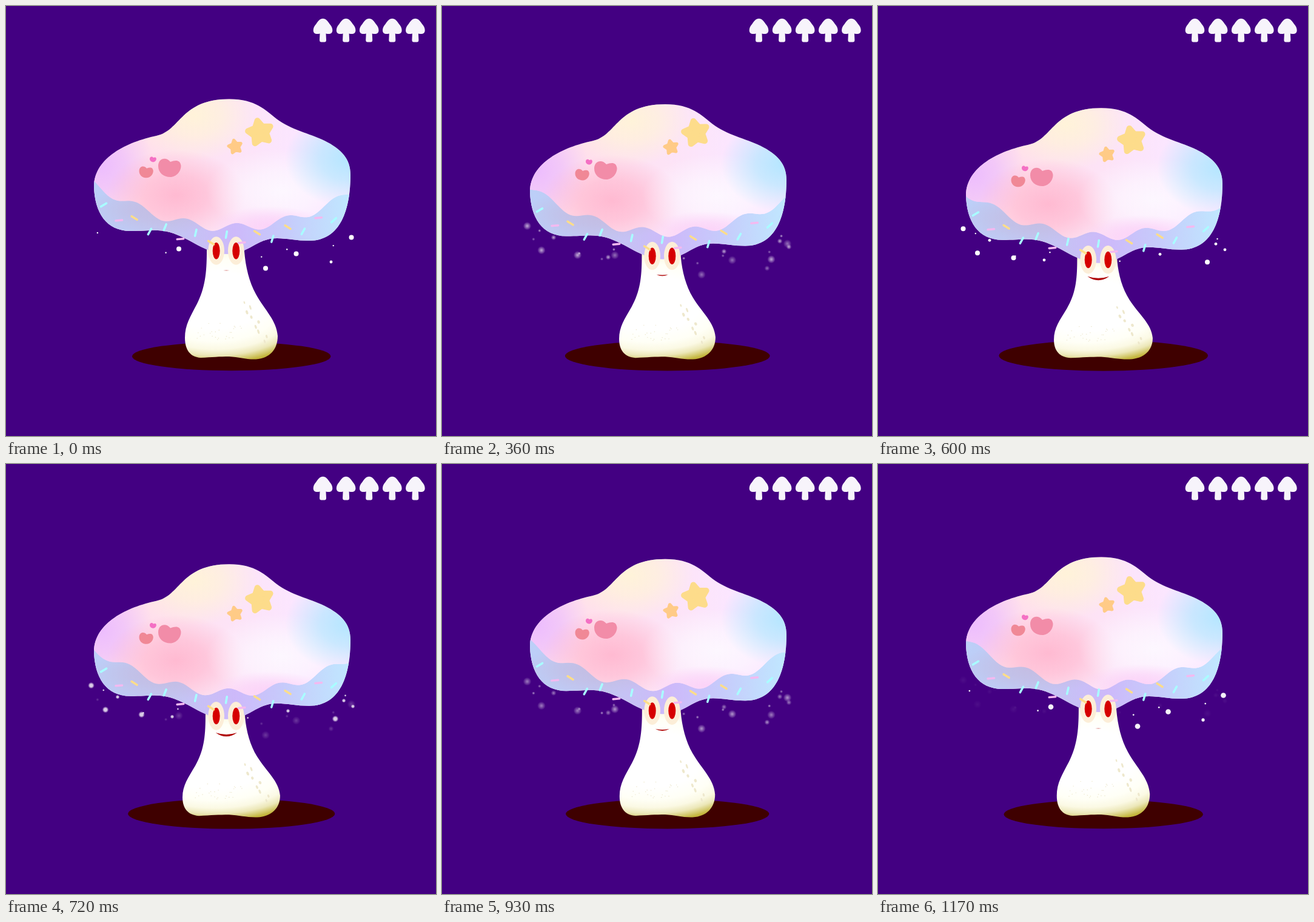
An HTML page with a canvas for the animation above (1.2 s loop, 709 by 709 pixels).

```html
<!DOCTYPE html>
<html lang="en">
<head>
<meta charset="utf-8">
<title>Bouncing mushroom</title>
<style>
  html, body { margin: 0; width: 100%; height: 100%; overflow: hidden; background: #430082; }
  canvas { display: block; width: 100vw; height: 100vh; }
</style>
</head>
<body>
<canvas id="stage" width="709" height="709"></canvas>
<script>
const ctx = document.getElementById('stage').getContext('2d');
const LOOP = 1200, STEP = 30, DROP = 15;
const WAVE_LENGTH = 82, WAVE_SPEED = .096;
const COLORS = { c: '#a9fdff', p: '#f4b9f0', y: '#fddd8a' };

const capPath = new Path2D(`M368 153.5 C412 153.5 428 172 446 186 C470 204 500 210 525 222
  C553 236 568 252 568 278 C568 335 552 387 500 387 C478 387 465 383 447 383
  C412 383 402 409 363 409 C328 408 305 383 270 373 C248 367 235 371 205 371
  C165 371 146 340 145 297 C146 250 200 224 248 214 C288 206 288 153.5 368 153.5Z`);
const bodyPath = new Path2D(`M331 385 L331 405 C331 441 328 465 315 491 C304 512 295 526 295 547
  C295 567 304 579 321 580 C340 579 352 578 368 578 C384 579 396 583 412 582.5
  C435 581 448 566 448 544 C446 518 427 502 412 475 C401 455 395 430 393 405 L393 385Z`);
const heartPath = new Path2D(`M271 257 C264 248 251 251 251 264 C251 275 260 282 271 282
  C281 282 289 272 288.5 263 C287 253 279 254 271 257Z`);
const iconPath = new Path2D(`M0 20.8 C5 20.8 8 25 11 29.5 C14 33 15.8 36 15.8 40 C15.8 46 11 47 5 45.5
  L5.5 56 Q5.5 59.5 2.5 59.5 H-2.5 Q-5.5 59.5 -5.5 56 L-5 45.5
  C-11 47 -15.8 46 -15.8 40 C-15.8 36 -14 33 -11 29.5 C-8 25 -5 20.8 0 20.8Z`);

// Eases 0 to 1 while rising, then back to 0 while falling.
function swing(time, riseStart, riseEnd, fallStart, fallEnd) {
  const ease = (from, to) => {
    const u = Math.max(0, Math.min(1, (time - from) / (to - from)));
    return (1 - Math.cos(Math.PI * u)) / 2;
  };
  return ease(riseStart, riseEnd) - ease(fallStart, fallEnd);
}

// Repeatable noise from 0 to 1.
function noise(seed) {
  const n = Math.sin(seed * 127.1) * 43758.5;
  return n - Math.floor(n);
}

function ellipse(x, y, rx, ry, color, angle = 0) {
  ctx.fillStyle = color;
  ctx.beginPath();
  ctx.ellipse(x, y, rx, ry, angle, 0, 7);
  ctx.fill();
}

function shifted(x, y, draw) {
  ctx.save();
  ctx.translate(x, y);
  draw();
  ctx.restore();
}

function gradient(shape, ...stops) {
  for (const [at, color] of stops) shape.addColorStop(at, color);
  return shape;
}

function glow(x, y, rx, ry, rgb, alpha = .95) {
  shifted(x, y, () => {
    ctx.scale(rx, ry);
    ctx.fillStyle = gradient(ctx.createRadialGradient(0, 0, 0, 0, 0, 1),
      [0, `rgba(${rgb},${alpha})`], [.45, `rgba(${rgb},${alpha * .68})`], [1, `rgba(${rgb},0)`]);
    ctx.fillRect(-1, -1, 2, 2);
  });
}

function drawIcons() {
  ctx.fillStyle = '#f7f4fb';
  for (let i = 0; i < 5; i++) shifted(522.5 + i * 38.1, 0, () => ctx.fill(iconPath));
}

function drawBody(drop, spread) {
  ctx.save();
  ctx.translate(371.5, 583);
  ctx.scale(1 + .065 * spread, 1 - drop / 170);
  ctx.translate(-371.5, -583);
  ctx.clip(bodyPath);
  shifted(345, 485, () => {
    ctx.scale(1.7, 1);
    ctx.fillStyle = gradient(ctx.createRadialGradient(0, 0, 0, 0, 0, 104),
      [.45, '#ffffff'], [.65, '#fffff6'], [.78, '#fbf9e4'], [.88, '#ece7b8'], [1, '#c3b53c']);
    ctx.fillRect(-60, -110, 130, 220);
  });
  for (let i = 0; i < 9; i++)
    ellipse(393 + 4.4 * i + 6 * Math.sin(2 * i), 489 + 8 * i, 1.2 + noise(i), 2 + 2 * noise(i + 9), '#eee8cd', -.3);
  for (let i = 0; i < 26; i++)
    ellipse(315 + 76 * noise(i + 20), 521 + 29 * noise(i + 60), .8, .7, '#ece7cc');
  ctx.restore();
}

function drawDrip(time) {
  ctx.fillStyle = gradient(ctx.createLinearGradient(145, 0, 568, 0),
    [0, '#bccff8'], [.3, '#c3c6f2'], [.55, '#cdb9fa'], [.75, '#c6cbfb'], [1, '#c0e8ff']);
  ctx.save();
  ctx.beginPath();
  for (let x = 140; x <= 572; x += 4) {
    const phase = 2 * Math.PI * (x - 380 - time * WAVE_SPEED) / WAVE_LENGTH;
    ctx.lineTo(x, 365 - .00143 * (x - 370) ** 2 - 7 * Math.cos(phase));
  }
  ctx.lineTo(572, 420);
  ctx.lineTo(140, 420);
  ctx.clip();
  ctx.fill();
  glow(260, 335, 130, 42, '196,186,222', .8);
  ctx.restore();
}

function drawCap(time) {
  ctx.save();
  ctx.clip(capPath);
  ctx.fillStyle = gradient(ctx.createLinearGradient(240, 0, 480, 0), [0, '#ffe0ec'], [1, '#fbe6ff']);
  ctx.fillRect(140, 150, 432, 262);
  glow(310, 180, 105, 75, '255,244,216');
  glow(158, 262, 85, 90, '236,187,255');
  glow(280, 312, 115, 75, '255,184,208');
  glow(455, 305, 125, 70, '253,248,255');
  glow(565, 252, 105, 80, '176,231,255');
  glow(435, 362, 95, 32, '251,206,247', .8);
  drawDrip(time);
  ctx.restore();
}

function drawStar(x, y, radius, color) {
  const corner = radius * .2;
  ctx.beginPath();
  for (let i = 0; i < 10; i++) {
    const r = (i % 2 ? radius * .63 : radius) - corner, angle = (-102 + i * 36) * Math.PI / 180;
    ctx.lineTo(x + r * Math.cos(angle), y + r * Math.sin(angle));
  }
  ctx.closePath();
  ctx.fillStyle = ctx.strokeStyle = color;
  ctx.lineWidth = corner * 2;
  ctx.lineJoin = 'round';
  ctx.fill();
  ctx.stroke();
}

function drawHeart(x, y, size, color) {
  shifted(x, y, () => {
    ctx.scale(size, size);
    ctx.translate(-270, -266.5);
    ctx.fillStyle = color;
    ctx.fill(heartPath);
  });
}

function drawFace(smile) {
  for (const x of [346.7, 379.3]) {
    ellipse(x, 403.5, 13.3, 23.3, '#fceed8');
    ellipse(x, 403.7, 6, 13.7, '#d60000');
  }
  const width = 5 + 13 * smile, corner = 436 - 5 * smile;
  ctx.globalAlpha = Math.min(1, .55 + smile);
  ctx.fillStyle = '#b00808';
  ctx.beginPath();
  ctx.moveTo(363.3 - width, corner);
  ctx.quadraticCurveTo(363.3, 435.2 + 1.8 * smile, 363.3 + width, corner);
  ctx.quadraticCurveTo(363.3, 436.8 + 7.2 * smile, 363.3 - width, corner);
  ctx.fill();
  ctx.globalAlpha = 1;
}

// Two staggered rows along the rim; cyan ones turn upright near the middle.
function drawSprinkles() {
  ctx.lineCap = 'round';
  ctx.lineWidth = 3.5;
  [...'cpyccpcycpycycpc'].forEach((kind, i) => {
    const x = 161 + 25.3 * i, bend = .0012 * (x - 363) ** 2;
    const degrees = { c: bend - 80, p: -5, y: 32 }[kind];
    shifted(x, 385 - bend + (i % 2 ? 6 : -8), () => {
      ctx.rotate(degrees * Math.PI / 180);
      ctx.strokeStyle = COLORS[kind];
      ctx.beginPath();
      ctx.moveTo(-5.3, 0);
      ctx.lineTo(5.3, 0);
      ctx.stroke();
    });
  });
}

// Spores blur as they fade.
function drawSpore(x, y, r, alpha) {
  const blur = Math.min(.85, 2 * (1 - alpha));
  const outer = r * (1 + blur * .6) + blur;
  const color = `rgba(255,255,255,${alpha})`;
  ellipse(x, y, outer, outer, blur < .12 ? color : gradient(
    ctx.createRadialGradient(x, y, r * (1 - blur), x, y, outer), [0, color], [1, 'rgba(255,255,255,0)']));
}

// Big spores have set places, tiny ones scatter under the rim.
function drawSpores(big, medium, tinyCount, seed, dy, alpha) {
  if (alpha <= 0) return;
  for (const [x, y] of big) drawSpore(x, y + dy, 4, alpha);
  for (const [x, y] of medium) drawSpore(x, y + dy, 2.4, alpha);
  for (let i = 0; i < tinyCount; i++) {
    const x = 130 + 446 * (i + noise(seed + i)) / tinyCount;
    const y = 420 - .001 * (x - 355) ** 2 + 20 * (noise(seed + i + 30) - .5);
    drawSpore(x, y + dy, 1.2, alpha);
  }
}

function render(now) {
  const time = Math.floor(now % LOOP / STEP) * STEP;
  const spread = 1 - Math.abs(time - 600) / 600;
  const drop = DROP * swing(time, 120, 560, 560, 1090);

  ctx.fillStyle = '#430082';
  ctx.fillRect(0, 0, 709, 709);
  drawIcons();
  const shadowHeight = 23.7 + 1.5 * spread;
  ellipse(371.7, 601.3 + .4 * spread - shadowHeight, 163.8 + 8.5 * spread, shadowHeight, '#3f0000');
  drawSpores([[285, 400.5], [428, 432.5], [478.5, 408.5], [569.5, 381.5]],
    [[536, 422]], 6, 1, drop * 1.22, 1 - spread);
  drawSpores([[140.5, 367.5], [164, 407.5], [223.5, 415.5], [543, 422.5]],
    [[184, 386.5], [274, 419], [465, 409.5], [557, 392.5], [572, 402]], 7, 5, (drop - DROP) * .75, spread);
  drawBody(drop, spread);
  shifted(0, drop, () => {
    drawCap(time);
    drawFace(swing(time, 200, 600, 660, 1200));
    drawSprinkles();
  });
  shifted(0, DROP * swing(time, 300, 700, 740, 1240), () => {
    drawStar(418.6, 208.4, 24.6, '#fddc8b');
    drawStar(377.8, 232, 13.3, '#ffcb87');
  });
  shifted(0, DROP * swing(time, 230, 600, 600, 1190), () => {
    drawHeart(270, 266.5, 1, '#f28ca8');
    drawHeart(231.3, 273.7, .62, '#f08896');
    drawHeart(242.5, 252.8, .29, '#f470c4');
  });
}

const start = performance.now();
function tick() {
  render(performance.now() - start);
  requestAnimationFrame(tick);
}
tick();
</script>
</body>
</html>
```
